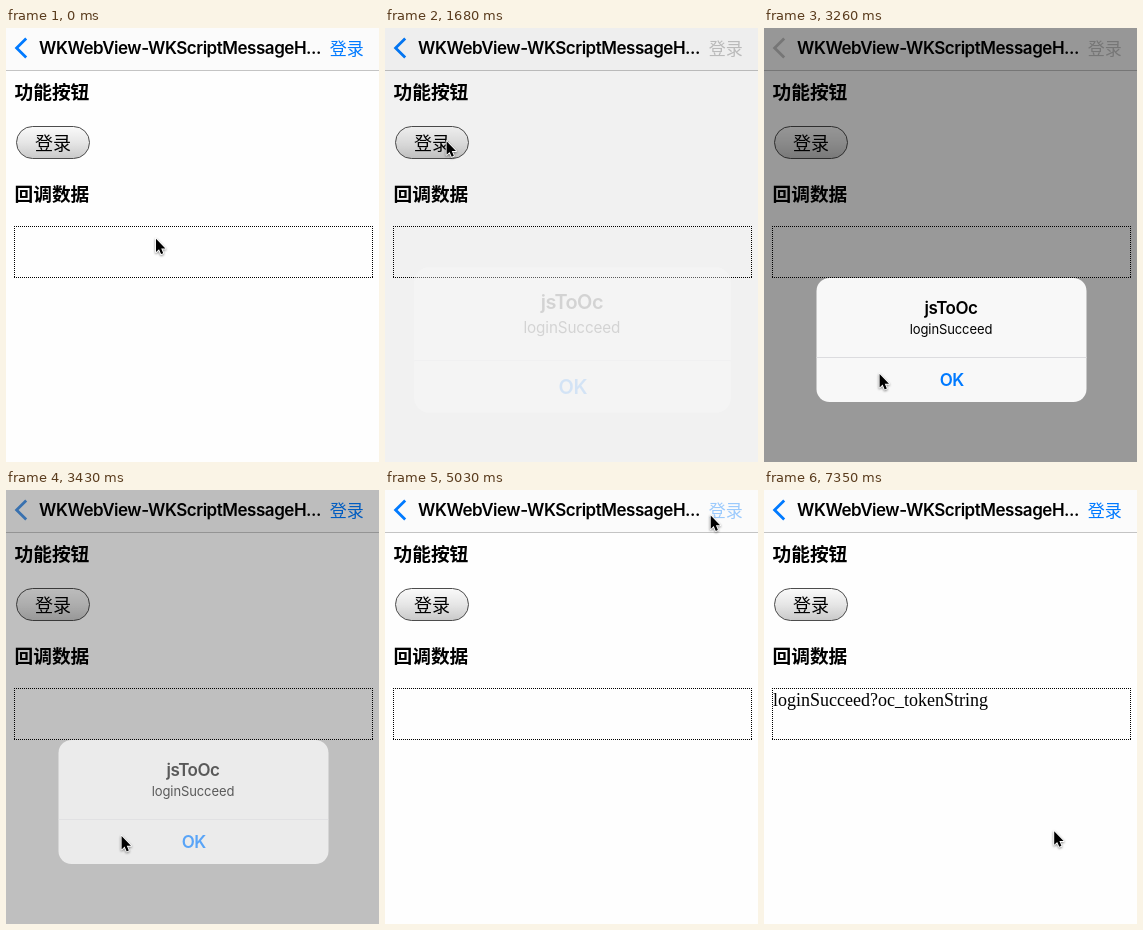
An HTML page for the animation above (7770 ms loop, 373x434 px).

```html
<!DOCTYPE html>
<html lang="zh-CN">
<head>
<meta charset="utf-8">
<title>WKScriptMessageHandler</title>
<style>
  html, body { margin: 0; width: 100%; height: 100%; overflow: hidden; background: #fefefe; }
  svg { display: block; width: 373px; height: 434px; }
  text { white-space: pre; }
  .ui { font-family: Inter, "Noto Sans", sans-serif; text-anchor: middle; }
  .semi { font-size: 17px; font-weight: 600; letter-spacing: -.47px; }
  .cjk { font-family: "Noto Sans CJK SC", "Noto Sans CJK", sans-serif; }
  .head { font-size: 18.72px; font-weight: 700; }
  .serif { font: 18px "Liberation Serif", serif; }
  #cursor { filter: drop-shadow(0 1px .8px rgba(0, 0, 0, .45)); }
</style>
</head>
<body>
<svg viewBox="0 0 373 434">
  <defs>
    <linearGradient id="gloss" x1="0" y1="0" x2="0" y2="1">
      <stop offset="0" stop-color="#fafafa"/>
      <stop offset=".5" stop-color="#e6e6e6"/>
      <stop offset="1" stop-color="#c9c9c9"/>
    </linearGradient>
  </defs>

  <rect width="373" height="434" fill="#fefefe"/>
  <rect width="373" height="42" fill="#fbfbfb"/>
  <rect y="42" width="373" height="1" fill="#c4c4c4"/>
  <path id="back" d="M20.2 10.6 10.6 20l9.6 9.4" fill="none" stroke="#007aff" stroke-width="2.8"/>
  <text class="ui semi" x="174" y="26">WKWebView-WKScriptMessageH...</text>
  <text id="login" class="cjk" x="323.7" y="26.5" font-size="17" fill="#007aff">登录</text>

  <text class="cjk head" x="8.5" y="71.3">功能按钮</text>
  <rect x="10.5" y="98.5" width="73" height="32" rx="16" fill="url(#gloss)" stroke="#4c4c4c"/>
  <text class="cjk" x="29" y="121.6" font-size="18">登录</text>
  <rect id="press" x="7.5" y="96" width="79" height="37.5" rx="18.5" opacity=".3"/>
  <text class="cjk head" x="8.5" y="173">回调数据</text>
  <path d="M8 198.5H367M8 249.5H367M8.5 198V250M366.5 198V250" stroke="#000" stroke-dasharray="1 1"/>
  <text id="result" class="serif" x="9" y="216">loginSucceed?oc_tokenString</text>

  <rect id="dim" width="373" height="434"/>
  <g id="alert">
    <rect id="panel" x="52.5" y="250" width="270" height="124" rx="13" fill="#f8f8f8"/>
    <g id="content">
      <rect x="52.5" y="329" width="270" height="1" fill="#dcdcdf"/>
      <text class="ui semi" x="187" y="285.8">jsToOc</text>
      <text class="ui" x="187" y="305.8" font-size="13" letter-spacing="-.1">loginSucceed</text>
      <text class="ui semi" x="187.7" y="358.2" fill="#007aff">OK</text>
    </g>
  </g>

  <path id="cursor" d="M0 0V13.4L3 10.6 5.1 15.4 7.2 14.5 5.2 9.8H9.4Z"
        stroke="#fff" stroke-width="1.8" stroke-linejoin="round" paint-order="stroke"/>
</svg>
<script>
const LOOP = 7770;
const BLUE = [0, 122, 255], GREY = [196, 196, 196];
const el = id => document.getElementById(id);
const back = el('back'), login = el('login'), press = el('press'), result = el('result'),
      dim = el('dim'), alertBox = el('alert'), panel = el('panel'), content = el('content'),
      cursor = el('cursor');

const clamp = v => Math.min(1, Math.max(0, v));
const smooth = u => u * u * (3 - 2 * u);
const easeOut = u => 1 - (1 - u) ** 3;
const linear = u => u;

// Progress that advances in n equal holds, the first one landing at t0, the last at t1.
const held = (t, t0, t1, n) => t < t0 ? 0 : clamp((Math.floor((t - t0) / (t1 - t0) * (n - 1) + 1e-6) + 1) / n);
const snap = (t, base, step) => base + Math.floor((t - base) / step + 1e-6) * step;

// start, end, steps, easing, path points (2: line, 4: cubic curve)
const moves = [
  [420, 1180, 13, smooth, [[150, 210.7], [64.3, 118.5]]],
  [1230, 1240, 1, linear, [[64.3, 118.5], [61.6, 113.3]]],
  [1850, 2380, 10, smooth, [[61.6, 113.3], [110, 258]]],
  [2440, 2900, 9, smooth, [[110, 258], [115.6, 346]]],
  [3610, 4790, 20, easeOut, [[115.6, 346], [325.7, 25.5]]],
  [5800, 6550, 14, smooth, [[325.7, 25.5], [340, 200], [240, 430], [250, 325]]],
  [6600, 7350, 14, smooth, [[250, 325], [235, 260], [345, 260], [290.2, 341.3]]]
];

// De Casteljau evaluation
function along(pts, u) {
  while (pts.length > 1)
    pts = pts.slice(1).map((p, i) => p.map((v, k) => pts[i][k] + (v - pts[i][k]) * u));
  return pts[0];
}

function cursorAt(t) {
  const move = moves.filter(m => t >= m[0]).pop();
  if (!move) return moves[0][4][0];
  const [t0, t1, n, ease, pts] = move;
  return along(pts, ease(held(t, t0, t1, n)));
}

function draw(t) {
  const shown = smooth(clamp((snap(t, 1620, 58.5) - 1590) / 390));
  const gone = smooth(clamp((snap(t, 3250, 60) - 3300) / 310));
  const a = shown * (1 - gone);
  const grow = t < 3000 ? 1.2 - .2 * shown : 1;

  dim.setAttribute('opacity', .4 * a);
  panel.setAttribute('opacity', Math.sqrt(a));
  content.setAttribute('opacity', a);
  alertBox.setAttribute('transform', `translate(187.5 312) scale(${grow}) translate(-187.5 -312)`);

  back.setAttribute('stroke', `rgb(${BLUE.map((v, i) => v + (GREY[i] - v) * a * a)})`);
  login.setAttribute('fill', `rgb(${t >= 1680 && t < 3370 ? GREY : BLUE})`);
  login.setAttribute('opacity', t < 4790 ? 1 : .25 + .75 * held(t, 5030, 5380, 6));

  press.setAttribute('visibility', t >= 1470 && t < 1620 ? 'visible' : 'hidden');
  result.setAttribute('visibility', t >= 5560 ? 'visible' : 'hidden');
  cursor.setAttribute('transform', `translate(${cursorAt(t)})`);
}

const start = performance.now();
function tick() {
  draw((performance.now() - start) % LOOP);
  requestAnimationFrame(tick);
}
tick();
</script>
</body>
</html>
```
